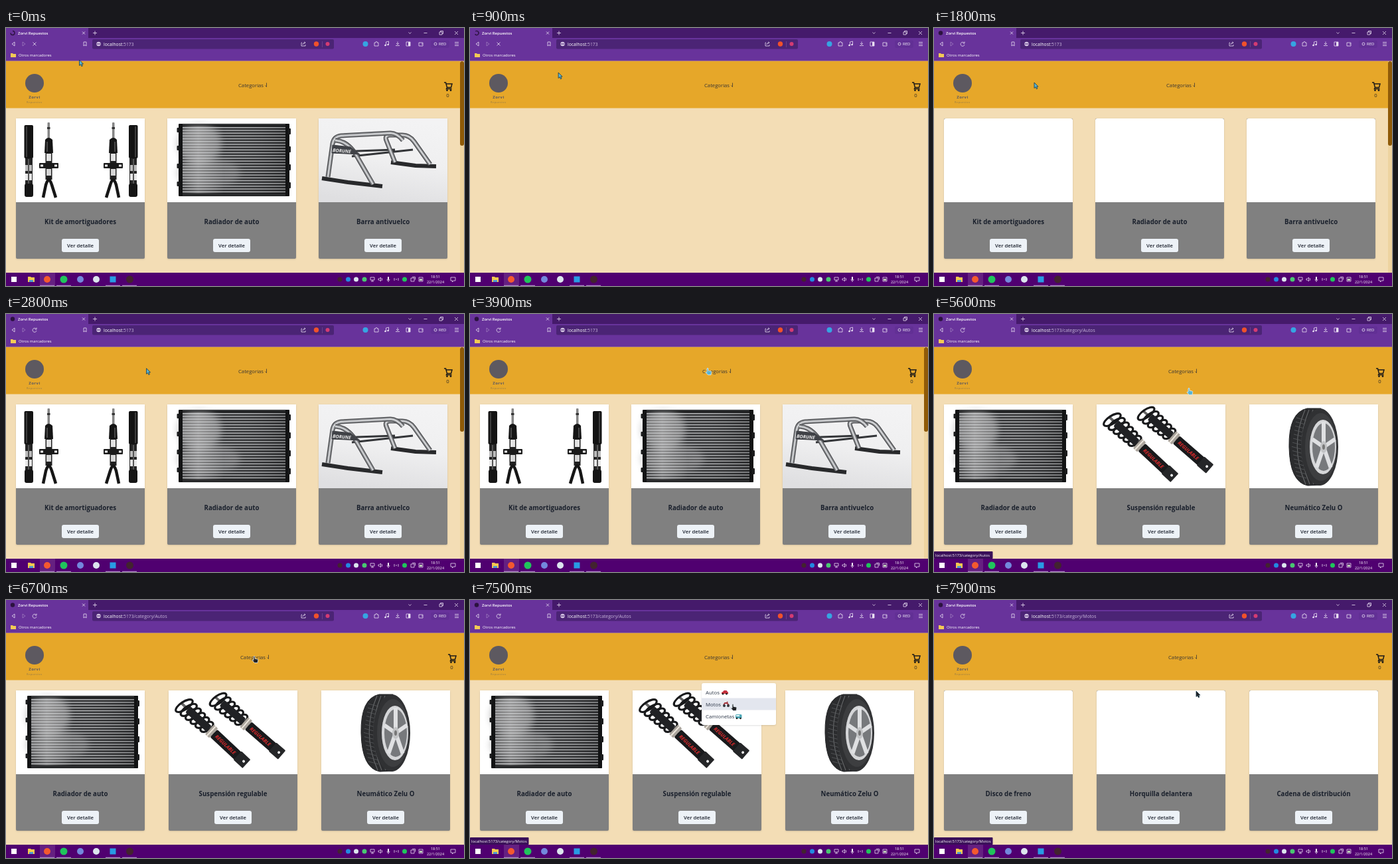
Recreate the animation shown at these times as an HTML page. Size 690x388 px, loop 8 s.

```html
<!DOCTYPE html>
<html lang="es">
<head>
<meta charset="utf-8">
<title>Tienda de repuestos</title>
<style>
  html, body { margin: 0; width: 100%; height: 100%; overflow: hidden; background: #f3ddb5; }
  svg { display: block; font-family: "Open Sans", "Noto Sans", sans-serif; }
  .mid { text-anchor: middle; }
  .line { fill: none; stroke: #e9dff2; stroke-width: .8; }
</style>
</head>
<body>
<svg id="stage" width="690" height="388" viewBox="0 0 690 388" xmlns="http://www.w3.org/2000/svg"></svg>
<script>
const LOOP = 8000;
const stage = document.getElementById('stage');

const rect = (x, y, w, h, fill, r = 0) => `<rect x="${x}" y="${y}" width="${w}" height="${h}" rx="${r}" fill="${fill}"/>`;
const dot = (x, y, r, fill) => `<circle cx="${x}" cy="${y}" r="${r}" fill="${fill}"/>`;
const oval = (x, y, rx, ry, fill, more = '') => `<ellipse cx="${x}" cy="${y}" rx="${rx}" ry="${ry}" fill="${fill}" ${more}/>`;
const path = (d, stroke, w = 1, fill = 'none') => `<path d="${d}" stroke="${stroke}" stroke-width="${w}" fill="${fill}"/>`;
const line = d => `<path class="line" d="${d}"/>`;
const text = (x, y, size, fill, str, extra = '') => `<text x="${x}" y="${y}" font-size="${size}" fill="${fill}" ${extra}>${str}</text>`;
const times = (n, draw) => Array.from({ length: n }, (_, i) => draw(i)).join('');

// Product pictures, each drawn in a 194 x 126 box
const strut =
  rect(12.5, 10, 13.5, 50, '#131313', 2) + rect(15, 12, 2, 46, '#3c3c3c') +
  rect(14, 60, 11, 44, '#242424') + rect(14, 70, 10, 9, '#bbb') + rect(14, 83, 10, 10, '#e8e8e8') +
  rect(18, 61, 2, 42, '#555') + rect(13, 98, 13, 20, '#151515', 3) +
  rect(47.5, 6, 3.5, 26, '#858585', 1) + rect(47, 13, 4.5, 3, '#333') +
  path('M44 32Q49 26 55 32L56 52H43Z', 'none', 0, '#151515') + rect(46, 35, 2, 15, '#484848') +
  rect(44.5, 52, 10, 40, '#202020') + rect(46, 53, 7, 11, '#e2e2e2') + rect(46, 76, 7, 10, '#d6d6d6') +
  rect(35, 67, 29, 8, '#1a1a1a', 1) + rect(37, 69.5, 4, 3, '#fff') + rect(58, 69.5, 4, 3, '#fff') +
  path('M41 119L45 100Q49.5 85 54 100L60 119', '#161616', 4.5);

const radiator =
  rect(18, 8, 166, 109, '#151617', 2) + rect(23, 12, 155, 101, '#2a2b2d') +
  oval(48, 38, 34, 30, '#aaa', 'opacity=".5" filter="url(#blur)"') + oval(62, 82, 48, 22, '#999', 'opacity=".4" filter="url(#blur)"') +
  times(24, i => rect(23, 13 + i * 4.2, 155, 1.5, '#aeb0b2')) +
  rect(23, 12, 155, 101, 'url(#shine)') +
  path('M22 9.5H180M22 115H180', '#505254', 1) +
  rect(17, 8, 6, 109, '#121314', 1) + rect(178, 8, 6, 109, '#121314', 1) +
  times(4, i => rect(14.5, 14 + i * 27, 4, 7, '#1b1c1d', 1) + rect(182, 15 + i * 27, 4, 9, '#1b1c1d', 1));

const tube = d => path(d, '#4c4d50', 7) + path(d, '#929497', 4.5) + path(d, '#e5e6e8', 1.4);
const rollBar =
  rect(0, 0, 194, 126, 'url(#studio)') +
  path('M28 50L115 47M50 57L142 47', '#333538', 3) +
  path('M109 66L146 71L177 72', '#28292b', 6) + path('M5 90L44 96L96 102', '#28292b', 6) +
  tube('M115 66L102 33Q99 25 108 25L126 25Q137 25 144 35L168 69') +
  tube('M14 88L21 38Q23 27 34 26L108 22Q118 22 127 33') +
  tube('M25 33Q46 34 60 61L82 99') +
  path('M21 40L48 43L62 54L20 52Z', '#404247', 1, '#404247') +
  text(21, 50, 7, '#eee', 'BORUNE', 'font-weight="700" font-style="italic" transform="rotate(5 21 50)"');

const coil = i => oval(9 + i * 9.5, 0, 6, 15 - i * .8, 'none', `stroke="#18191b" stroke-width="3.2" transform="rotate(14 ${9 + i * 9.5} 0)"`);
const coilover =
  path('M3 0H112', '#666', 4) + times(6, coil) +
  rect(17, -6, 44, 12, '#202124', 2) + rect(62, -10, 9, 20, '#aaa49c', 2) + rect(65, -10, 2, 20, '#efe9df') +
  rect(71, -8, 55, 16, '#191a1c', 2) + rect(121, -9, 19, 18, '#252628', 1) + dot(134, 0, 2, '#fff') +
  text(76, 3, 7.5, '#e12a2c', 'REGULABLE', 'font-weight="700" font-style="italic"');
const suspension =
  `<g transform="translate(68 8) rotate(41) scale(.97)">${coilover}</g>` +
  `<g transform="translate(17 17) rotate(43) scale(.98)">${coilover}</g>`;

const spoke = i => {
  const a = i * Math.PI * .4 - 1.57;
  return path(`M112 64L${112 + 18 * Math.cos(a)} ${64 + 38 * Math.sin(a)}`, '#dfe0e2', 6);
};
const tire =
  path('M87 6Q59 12 60 64Q61 117 88 122L108 121V6Z', '#252628', 1, '#2b2c2e') +
  times(4, i => path(`M${84 + i * 6} 8Q${60 + i * 7} 64 ${85 + i * 6} 120`, '#66686a', 1.1)) +
  times(15, i => path(`M${64 + Math.abs(i - 7)} ${20 + i * 6.2}l15 4`, '#55575a', .9)) +
  oval(106, 64, 28, 58, '#303133') + oval(108, 64, 24, 51, '#3d3e40') +
  oval(111, 64, 20, 41, '#d5d6d8') + oval(112, 64, 17, 36, '#77797c') +
  times(5, spoke) + oval(112, 64, 5, 9, '#c2c3c5') + oval(112, 64, 2, 4, '#777');

const defs = `<defs>
  <linearGradient id="shine"><stop offset="0" stop-color="#fff" stop-opacity=".1"/>
    <stop offset=".15" stop-color="#fff" stop-opacity=".3"/><stop offset=".4" stop-color="#fff" stop-opacity=".05"/>
    <stop offset="1" stop-color="#000" stop-opacity=".15"/></linearGradient>
  <linearGradient id="studio" x1=".6" x2=".4" y2="1"><stop stop-color="#f3f3f4"/><stop offset=".5" stop-color="#efeff0"/><stop offset="1" stop-color="#dfdfe1"/></linearGradient>
  <filter id="blur"><feGaussianBlur stdDeviation="5"/></filter>
  <filter id="soft" x="-10%" y="-10%" width="120%" height="125%"><feDropShadow dx="0" dy=".7" stdDeviation=".8" flood-opacity=".15"/></filter>
  <g id="shocks">${strut}<g transform="translate(196 0) scale(-1 1)">${strut}</g></g>
  <g id="radiator">${radiator}</g><g id="rollBar">${rollBar}</g>
  <g id="suspension">${suspension}</g><g id="tire">${tire}</g></defs>`;

// Product lists
const catalog = {
  home: { step: 228, titles: ['Kit de amortiguadores', 'Radiador de auto', 'Barra antivuelco'], pictures: ['shocks', 'radiator', 'rollBar'] },
  autos: { step: 230, titles: ['Radiador de auto', 'Suspensión regulable', 'Neumático Zelu O'], pictures: ['radiator', 'suspension', 'tire'] },
  motos: { step: 230, titles: ['Disco de freno', 'Horquilla delantera', 'Cadena de distribución'], pictures: [] }
};
const card = (x, title) =>
  `<g filter="url(#soft)">${rect(x, 136, 194, 211, '#808080', 2)}</g>` +
  path(`M${x} 262V139q0-3 3-3h188q3 0 3 3V262Z`, 'none', 0, '#fff') +
  text(x + 97, 294.5, 9.7, '#1a202c', title, 'class="mid" font-weight="700"') +
  rect(x + 69, 317, 56, 20, '#edf2f7', 3) +
  text(x + 97, 330, 7.7, '#1a202c', 'Ver detalle', 'class="mid" font-weight="600"');
const picture = (name, x) => rect(x, 136, 194, 126, '#fff') + `<use href="#${name}" x="${x}" y="136"/>`;
const productList = ([name, { step, titles, pictures }]) => `<g id="${name}">
  ${titles.map((title, i) => card(15 + i * step, title)).join('')}
  <g id="${name}Pictures">${pictures.map((p, i) => picture(p, 15 + i * step)).join('')}</g></g>`;

// Browser window
const browser =
  rect(0, 0, 690, 49.5, '#68339b') + rect(124, 0, 566, 15, '#451a6b') +
  `<g id="favicon">${dot(10, 7.5, 3.2, '#2b123f')}</g>` +
  `<g id="spinner">${path('M10 4.5A3 3 0 1 1 7 7.5', '#2b123f', 1.3)}</g>` +
  text(18, 9.6, 5.9, '#fff', 'Zorvi Repuestos', 'font-weight="600"') +
  line('M115 5.5l4 4m0-4l-4 4M131 7.5h6m-3-3v6M606.5 6.5l2 2 2-2M629.5 7.5h5M653 6h4v4h-4zM654.5 6V4.5h4v4H657M676 5l5 5m0-5l-5 5') +
  line('M13 21l-4 3 4 3z') + `<g opacity=".4">${line('M25 21l4 3-4 3z')}</g>` +
  `<g id="reload">${line('M45.5 22.5A3 3 0 1 0 46 25M46 20.5v2.5h-2.5')}</g>` +
  `<g id="stop">${line('M40.5 21.5l5 5m0-5l-5 5')}</g>` +
  line('M117 21h4v6l-2-1.5-2 1.5z') +
  rect(130, 17, 364, 14.5, '#4b2475', 2) +
  dot(139.5, 24, 3.2, '#d4c4e2') + rect(137, 23.5, 5, 1, '#4b2475') +
  `<text x="147" y="26.6" font-size="6.75" fill="#fff">localhost<tspan id="address" fill="#c9b5dc"></tspan></text>` +
  line('M446 22h-1v5h6v-2M447 25q0-3 4-3m-1.5-1.5l1.5 1.5-1.5 1.5') +
  dot(467.5, 24, 3.7, '#f0512b') + rect(476, 20, .6, 9, '#7b579b') + dot(484.5, 24, 3, '#d33b73') +
  dot(541.5, 24, 4, '#36a5e2') +
  line('M555 22h2q0-2 1.5-1.5t.5 1.5h2v5h-6zM572.5 26v-5l4-1v5M587 26.5h6M590 20.5v4m-2-1.5l2 2 2-2M603 21h6v6h-6zM622 22h6v5h-6zM626 24h2M676 21.5h6M676 24h6M676 26.5h6') +
  dot(571.5, 26, 1.3, '#e9dff2') + dot(575.5, 25, 1.3, '#e9dff2') +
  rect(606, 21, 3, 6, '#e9dff2') + rect(640, 18.5, 28, 11.5, '#623095', 3) +
  '<circle class="line" cx="647" cy="24" r="2"/>' + text(652, 26.3, 5.9, '#fff', 'RED') +
  path('M7 38h3l1 1h4v5H7z', 'none', 0, '#f4ca55') +
  text(19, 42.7, 5.9, '#fff', 'Otros marcadores');

// Shop header
const header =
  rect(0, 49.5, 690, 71, '#e6a729') + dot(43, 83, 14, '#5d5960') +
  text(43, 106, 6, '#5d5960', 'Zorvi', 'class="mid" font-weight="700" letter-spacing=".5"') +
  text(43, 113, 3.4, '#80704f', 'Repuestos', 'class="mid" letter-spacing=".8"') +
  `<g id="category">${text(350, 88.6, 7.7, '#3a3635', 'Categorias')}${path('M392.5 82.5v6l-2-2', '#3a3635', .8)}</g>` +
  `<g id="cart">${path('M660 82h2.5l2 7.5h6l1.5-5.5H663.5M664.5 89.500l-1 2h8', '#1c1a18', 1.5)}${dot(664.5, 93.7, 1.4, '#1c1a18')}${dot(670, 93.7, 1.4, '#1c1a18')}
    ${text(665.5, 104, 7.7, '#2f2b26', '0', 'class="mid"')}</g>` +
  `<g id="scrollbar">${rect(684, 50, 6, 318, '#eed3a0')}${rect(684, 50, 6, 127, '#8f5a08', 3)}</g>`;

// Drop-down list with tiny vehicles
const wheels = (x, y) => dot(x + 2, y, 1.3, '#222') + dot(x + 7.5, y, 1.3, '#222');
const menu = `<g id="menu"><g filter="url(#soft)">${rect(346, 125, 112, 63, '#fff', 3)}</g>
  <rect id="hover" x="346" width="112" height="18" fill="#e3e6ee"/>
  ${['Autos', 'Motos', 'Camionetas'].map((item, i) => text(352, 141.5 + i * 18.2, 7.8, '#2d3748', item)).join('')}
  ${path('M376 141v-2l2-1 1.5-2h4l1.5 2 1 1v2z', 'none', 0, '#c5303c')}${wheels(376, 141.3)}
  ${path('M379 158l2-3h3l3 3M384 155l1-2', '#a3343c', 1.8)}${dot(380, 159, 2, '#33363c')}${dot(386, 159, 2, '#33363c')}
  ${rect(397, 172, 9.5, 6, '#4fa9b8', 1.5)}${rect(398, 173, 5, 2, '#e4f4f7')}${wheels(397, 178)}</g>`;

// Taskbar
const folder = x => path(`M${x - 5} 374h4l1 1h5v7h-10z`, 'none', 0, '#f2c84f') + rect(x - 3, 379, 6, 3, '#4e9bd3');
const taskbar =
  rect(0, 368, 690, 20, '#500070') + rect(51, 368, 23, 20, '#652081') +
  rect(8, 374, 8, 8, '#fff') + folder(38) + dot(62, 378, 5, '#f4592f') + dot(87, 378, 5.5, '#20c45c') +
  dot(112, 378, 5, '#7388dc') + dot(136, 378, 5, '#dce5ee') + rect(156.5, 373.5, 9, 9, '#299be4') + dot(186.5, 378, 5.5, '#42232f') +
  [51, 76, 150, 175].map(x => rect(x, 386.8, 22, 1.2, '#b18bc8')).join('') +
  [[503, '#42232f'], [515.5, '#2389e1'], [527.5, '#dce5ee'], [540, '#49c772'], [600.5, '#20c45c']].map(([x, c]) => dot(x, 378, 3.5, c)).join('') +
  line('M549 375h6v4h-6zM552 379v2m-2 0h4M561 377h1.5l2-2v6l-2-2H561zM566 376q1.5 2 0 4M574 378q0 2 2 2t2-2M576 380v2M585 376v4m6-4v4M587 378h2M610 376h5v5h-5zM612 374.5h4.5v4M622 375h6v6h-6zM670 375h7v5h-3l-1.5 2v-2H670z') +
  rect(575, 374, 2, 5, '#fff', 1) + rect(623, 377, 4, 3, '#b9c9b6') +
  text(647, 375.6, 5.5, '#fff', '18:51', 'class="mid"') + text(647, 384.3, 5.5, '#fff', '22/1/2024', 'class="mid"');

const status = `<g id="status">${rect(0, 357, 88.5, 11, '#3a0f59', 1)}<text id="link" x="2" y="364.8" font-size="5.8" fill="#fff"></text></g>`;
const pointer = `<g id="pointer" stroke-width=".8" stroke-linejoin="round">
  <path id="arrow" d="M0 0V8.5l2-1.8 1.4 3 1.5-.7-1.4-2.9H6z"/>
  <path id="hand" d="M-1 1q1-1.500 2 0v3.200l4 .8q1 .4.8 1.600L5 10.500H.5L-3 6.800q0-1.200 2-.3z"/></g>`;

stage.innerHTML = defs + rect(0, 0, 690, 388, '#f3ddb5') +
  Object.entries(catalog).map(productList).join('') + header + browser + menu + taskbar + status + pointer;

// Timelines: [start, ...values]
const pages = [
  [0, 'home', true], [500, 'empty'], [1400, 'home', false], [2000, 'home', true],
  [5400, 'autos', false], [5500, 'autos', true], [7700, 'empty'], [7800, 'motos', false]
];
const moves = [
  [0, 110.5, 48], [200, 110.5, 48], [1500, 151, 82], [2300, 151, 82], [3700, 358, 81], [4300, 358, 81], [4900, 380, 136],
  [5300, 380, 136], [5600, 384, 111], [5900, 384, 111], [6200, 374, 84], [6700, 374, 84],
  [7400, 396, 156], [7650, 396, 156], [7850, 395, 137], [LOOP, 395, 137]
];
const tints = [[0, '#58b4d4'], [4700, '#8b9298'], [5400, '#58b4d4'], [6700, '#202124']];

const $ = id => document.getElementById(id);
const show = (id, on) => { $(id).style.display = on ? '' : 'none'; };
const shift = (id, x) => $(id).setAttribute('transform', `translate(${x} 0)`);
const current = (list, t) => list.findLast(([start]) => start <= t);

function pointerAt(t) {
  const i = moves.findIndex(([time]) => time > t);
  const [t0, x0, y0] = moves[i - 1], [t1, x1, y1] = moves[i];
  const p = (t - t0) / (t1 - t0), ease = p * p * (3 - 2 * p);
  return [x0 + (x1 - x0) * ease, y0 + (y1 - y0) * ease];
}

function render(t) {
  const [, page, loaded] = current(pages, t);
  for (const name in catalog) {
    show(name, name === page);
    show(name + 'Pictures', loaded);
  }
  const wide = page !== 'home';
  shift('category', wide ? 3 : 0);
  shift('menu', wide ? 3 : 0);
  shift('cart', wide ? 6 : 0);
  show('scrollbar', !wide);

  const loading = t < 1100;
  ['spinner', 'stop'].forEach(id => show(id, loading));
  ['favicon', 'reload'].forEach(id => show(id, !loading));
  $('spinner').setAttribute('transform', `rotate(${t * .36} 10 7.5)`);
  $('address').textContent = ':5173' + (t >= 7650 ? '/category/Motos' : t >= 5350 ? '/category/Autos' : '');

  const [x, y] = pointerAt(t);
  const opened = t < 6000 ? 4250 : 6800, closed = t < 6000 ? 5400 : 7650;
  const open = t >= opened && t < closed;
  const row = open ? Math.floor((y - 130) / 18) : -1;
  show('menu', open);
  $('menu').setAttribute('opacity', Math.min(1, Math.max(0, (t - opened) / 150)));
  show('hover', row >= 0);
  $('hover').setAttribute('y', 130 + Math.max(0, row) * 17.5);

  const target = row >= 0 ? ['Autos', 'Motos'][row] : t >= 7650 ? 'Motos' : t >= 5400 && t < 5950 ? 'Autos' : '';
  show('status', target);
  $('link').textContent = 'localhost:5173/category/' + target;

  const hand = t >= 3500 && t < 7700;
  const tint = current(tints, t)[1];
  show('hand', hand);
  show('arrow', !hand);
  $('pointer').setAttribute('transform', `translate(${x} ${y})`);
  $('pointer').setAttribute('fill', tint);
  $('pointer').setAttribute('stroke', hand ? '#e4eef2' : '#17384a');
}

function tick() {
  render(performance.now() % LOOP);
  requestAnimationFrame(tick);
}
tick();
</script>
</body>
</html>
```
